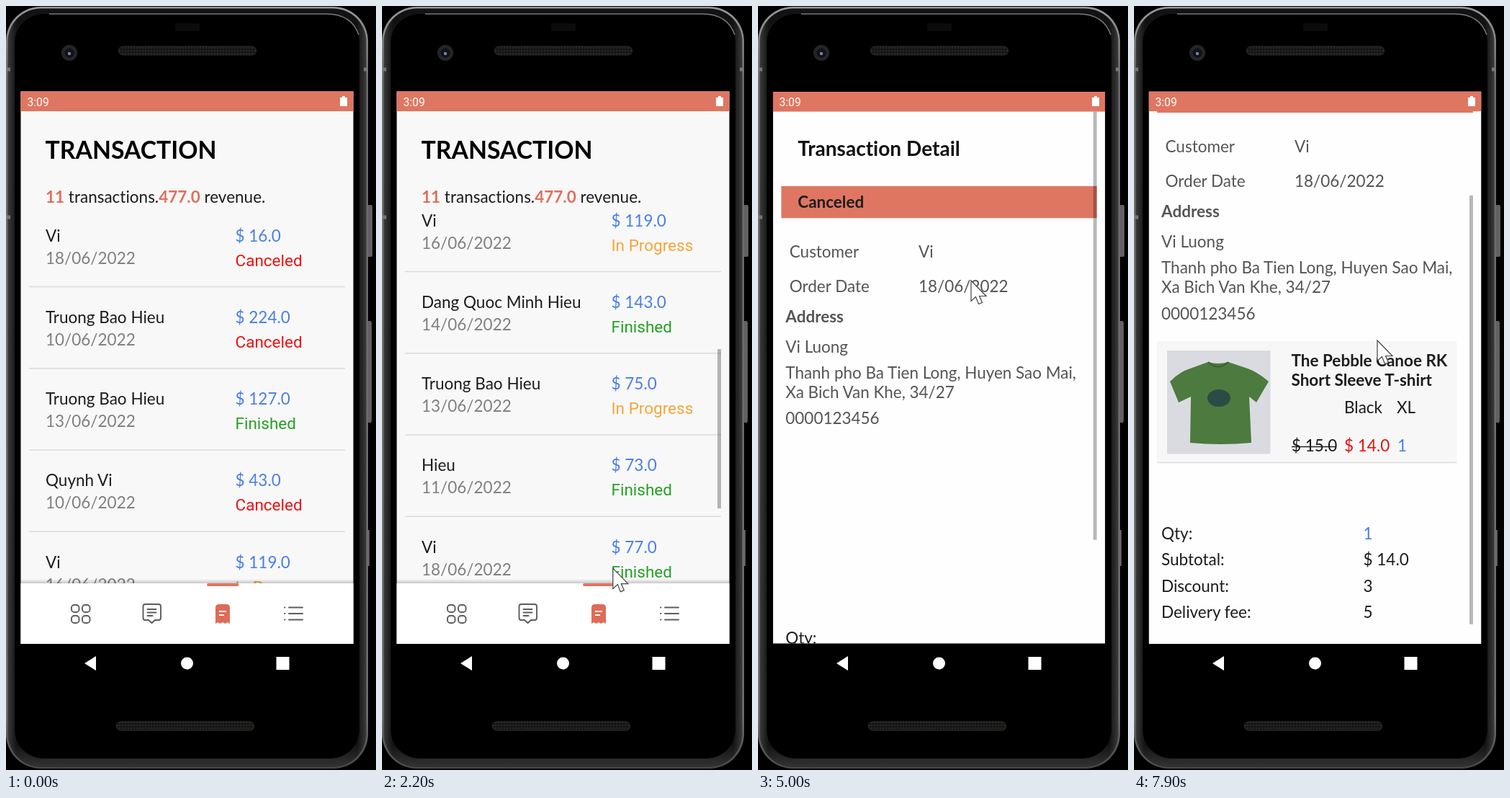
An HTML page that plays this animation: 514x1060 px, repeating every 8000 ms.

```html
<!DOCTYPE html>
<html lang="en">
<head>
<meta charset="utf-8">
<title>Transactions</title>
<style>
html, body { margin: 0; width: 100%; height: 100%; overflow: hidden; background: #000; }
svg { display: block; width: 514px; height: 1060px; }
text { font: 22.5px Lato, sans-serif; font-variant-ligatures: none; fill: #1c1c1c; }
.b { font-weight: 700; }
.red { fill: #df6f5c; }
.date { fill: #808080; }
.price { fill: #4a7fe6; }
.status { font-family: Roboto, sans-serif; }
.soft { fill: #555; }
.icon { fill: none; stroke: #5c5c5c; stroke-width: 1.9; stroke-linecap: round; stroke-linejoin: round; }
</style>
</head>
<body>
<svg viewBox="0 0 514 1060">
  <defs>
    <clipPath id="screen"><rect x="20.5" y="118.5" width="462" height="766.5"/></clipPath>
    <clipPath id="listBox"><rect x="20" y="276.5" width="463" height="525"/></clipPath>
    <clipPath id="detailBox"><rect x="20" y="146" width="463" height="739"/></clipPath>
    <linearGradient id="rim" x2="0" y2="1">
      <stop stop-color="#999"/><stop offset=".1" stop-color="#6a6a6a"/>
      <stop offset=".93" stop-color="#707070"/><stop offset="1" stop-color="#484848"/>
    </linearGradient>
    <linearGradient id="side">
      <stop stop-color="#3a3a3a"/><stop offset=".025" stop-color="#121212"/>
      <stop offset=".975" stop-color="#121212"/><stop offset="1" stop-color="#3a3a3a"/>
    </linearGradient>
    <linearGradient id="chin" x2="0" y2="1">
      <stop offset=".97" stop-color="#333" stop-opacity="0"/><stop offset="1" stop-color="#333"/>
    </linearGradient>
    <linearGradient id="shade" x2="0" y2="1">
      <stop stop-color="#000" stop-opacity="0"/><stop offset="1" stop-color="#000" stop-opacity=".2"/>
    </linearGradient>
    <pattern id="mesh" width="4" height="4" patternUnits="userSpaceOnUse">
      <rect width="4" height="4" fill="#161616"/><circle cx="2" cy="2" r="1" fill="#303030"/>
    </pattern>
  </defs>

  <!-- phone body -->
  <path d="M503 276h4q2 0 2 3v66q0 3-2 3h-4zM503 437h3q2 0 2 3v135q0 3-2 3h-3zM503 727h2v50h-2z" fill="#626262"/>
  <rect y="1" width="503" height="1057" rx="48" fill="url(#rim)"/>
  <rect x="2.5" y="3.5" width="498" height="1052" rx="46" fill="url(#side)"/>
  <rect x="2.5" y="3.5" width="498" height="1052" rx="46" fill="url(#chin)"/>
  <rect x="12" y="11" width="479" height="1033" rx="40" fill="#000"/>
  <path d="M60 11H445Q480 11 490 40" fill="none" stroke="#777" stroke-width="1.5"/>
  <path d="M0 88h6M0 293h6M497 88h6" stroke="#777" stroke-width="5"/>
  <rect x="235" y="24" width="34" height="11" rx="2" fill="#0b0b0b"/>
  <circle cx="88" cy="65" r="11" fill="#242527"/>
  <circle cx="88" cy="65" r="6.5" fill="#101218"/>
  <circle cx="88" cy="66" r="2.200" fill="#7884a4"/>
  <rect x="156.500" y="56" width="191" height="12" rx="6" fill="url(#mesh)" stroke="#2c2c2c"/>
  <rect x="153.500" y="993" width="191" height="12" rx="6" fill="url(#mesh)" stroke="#34332a"/>
  <path d="M109 912 125 902V922ZM375.500 903h18v18h-18z" fill="#fff"/>
  <circle cx="251.500" cy="912" r="8.500" fill="#fff"/>

  <g clip-path="url(#screen)">
    <g id="listPage">
      <rect x="20" y="118" width="463" height="768" fill="#f8f8f8"/>
      <rect x="20" y="118" width="463" height="28" fill="#df7661"/>
      <text class="b" x="54.500" y="211.500" style="font-size:33.750px;fill:#000">TRANSACTION</text>
      <text x="55" y="272.500"><tspan class="b red">11</tspan> transactions.<tspan class="b red">477.0</tspan> revenue.</text>
      <g clip-path="url(#listBox)"><g id="rows"></g></g>
      <rect id="listThumb" x="466" width="5" height="221" fill="#000" opacity=".28"/>
      <rect x="20" y="795" width="463" height="6" fill="url(#shade)"/>
      <rect x="20" y="801" width="463" height="85" fill="#fff"/>
      <rect x="279" y="801" width="44.500" height="4" rx="2" fill="#df7661"/>
      <g class="icon">
        <path d="M190.500 833q0-3 3-3h18.500q3 0 3 3v16q0 3-3 3h-5l-4.500 4-4.500-4h-4.500q-3 0-3-3zM196.500 837h12M196.500 841.500h12M196.500 846h7"/>
        <path d="M393 834.500h19M393 843h19M393 851.500h19M387 834.500h.5M387 843h.5M387 851.500h.5"/>
        <g id="grid"></g>
      </g>
      <path d="M291 857V835q0-5 5-5h10q5 0 5 5v22l-3.300-2-3.300 2-3.400-2-3.300 2-3.400-2z" fill="#df6b57"/>
      <path d="M296 840h10M296 845h7" stroke="#fff" stroke-width="2"/>
    </g>

    <g id="detailPage">
      <rect x="20.500" y="118.500" width="462" height="766.500" fill="#fefefe"/>
      <g clip-path="url(#detailBox)">
        <g id="detail">
          <text class="b" x="55" y="208" style="font-size:28.100px;fill:#111">Transaction Detail</text>
          <rect x="32" y="249.500" width="439" height="44.500" fill="#df7661"/>
          <text class="b" x="55" y="279.500">Canceled</text>
          <g id="loaded">
            <rect x="32" y="611" width="416.500" height="168" fill="#f7f7f7"/>
            <path d="M32 779.500H448.500" stroke="#dcdcdc" stroke-width="1.500"/>
            <rect x="46" y="624" width="143.500" height="143.500" fill="#d9dbe1"/>
            <path d="M103 640Q117 644 131 640L158 649Q172 654 187 667L170 696 160 688 163 752Q120 756 78 752L79 688 62 696 50 667Q64 653 78 649Z" fill="#4d7a3e"/>
            <path d="M103 640Q117 653 131 640" fill="none" stroke="#3a602e" stroke-width="2"/>
            <ellipse cx="118" cy="690" rx="16" ry="12" fill="#2b4c46"/>
            <path d="M219 757.500h61" stroke="#222" stroke-width="1.500"/>
          </g>
        </g>
      </g>
      <rect id="detailThumb" x="466" width="5" height="595" fill="#000" opacity=".28"/>
      <rect x="20.500" y="118.500" width="462" height="27.500" fill="#df7661"/>
    </g>
    <text x="29.500" y="138.500" style="font:15.700px Roboto,sans-serif;fill:#fff">3:09</text>
    <path d="M464 127h3v-2h4v2h3v12h-10z" fill="#fff"/>
  </g>
  <path id="cursor" d="M0 0V28.500L6.500 22.500 10.500 32.500 15.500 30.500 11.500 21.500H21Z" fill="#fff" stroke="#444" stroke-width="1.200"/>
</svg>
<script>
const $ = id => document.getElementById(id);
const label = (x, y, str, cls = '', color = '') =>
  `<text x="${x}" y="${y}" class="${cls}" ${color && `style="fill:${color}"`}>${str}</text>`;

const ROW = 113.25;
const colors = { Canceled: '#ec1313', Finished: '#25a025', 'In Progress': '#f3a63b' };
const orders = [
  ['Vi', 18, 16, 'Canceled'], ['Truong Bao Hieu', 10, 224, 'Canceled'],
  ['Truong Bao Hieu', 13, 127, 'Finished'], ['Quynh Vi', 10, 43, 'Canceled'],
  ['Vi', 16, 119, 'In Progress'], ['Dang Quoc Minh Hieu', 14, 143, 'Finished'],
  ['Truong Bao Hieu', 13, 75, 'In Progress'], ['Hieu', 11, 73, 'Finished'],
  ['Vi', 18, 77, 'Finished'], ['Truong Bao Hieu', 11, 159, 'Canceled'],
  ['Quynh Vi', 12, 57, 'Finished']
];
$('rows').innerHTML = orders.map(([name, day, price, status], i) =>
  `<g transform="translate(0 ${i * ROW})">` +
  label(55, 326.5, name) + label(55, 357.5, day + '/06/2022', 'date') +
  label(318.5, 326.5, `$ ${price}.0`, 'price') +
  label(318.5, 360.5, status, 'status', colors[status]) +
  '<path d="M32 389.500H471" stroke="#dcdcdc" stroke-width="1.500"/></g>').join('');

$('grid').innerHTML = [91, 106].map(x => [831, 846].map(y =>
  `<rect x="${x}" y="${y}" width="10.500" height="10" rx="3.800"/>`).join('')).join('');

const totals = [['Qty:', '1', 'price'], ['Subtotal:', '$ 14.0'], ['Discount:', '3'], ['Delivery fee:', '5']];
const totalY = i => 886 + i * 36.3;

$('detail').insertAdjacentHTML('beforeend', [
  [43.5, 349, 'Customer'], [223, 349, 'Vi'],
  [43.5, 396.5, 'Order Date'], [223, 396.5, '18/06/2022'],
  [38, 439, 'Address', 'b'], [38, 481, 'Vi Luong'],
  [38, 517, 'Thanh pho Ba Tien Long, Huyen Sao Mai,'],
  [38, 544, 'Xa Bich Van Khe, 34/27'], [38, 580.5, '0000123456'],
  [38, 1054.5, 'Total:', 'b']
].map(([x, y, str, cls = '']) => label(x, y, str, cls + ' soft')).join('') +
  totals.map(([name], i) => label(38, totalY(i), name)).join(''));

$('loaded').insertAdjacentHTML('beforeend',
  label(218.5, 645.5, 'The Pebble Canoe RK', 'b') + label(218.5, 672.5, 'Short Sleeve T-shirt', 'b') +
  label(292, 710.5, 'Black') + label(365, 710.5, 'XL') +
  label(219, 763.5, '$ 15.0') + label(292, 763.5, '$ 14.0', '', '#ee1111') + label(366, 763.5, '1', 'price') +
  totals.map(([, value, cls], i) => label(318.5, totalY(i), value, cls)).join('') +
  label(318.5, 1054.5, '$ 22.0', 'b', '#ee1111'));

const linear = p => p;
const out = p => 1 - (1 - p) ** 2;
const smooth = p => p * p * (3 - 2 * p);
const clamp = p => Math.min(1, Math.max(0, p));

// Keys are [time, values, easing towards this key].
function track(keys, t) {
  const i = keys.findIndex(k => k[0] > t);
  if (i < 1) return (i ? keys[keys.length - 1] : keys[0])[1];
  const [t0, a] = keys[i - 1], [t1, b, ease = linear] = keys[i];
  const p = ease((t - t0) / (t1 - t0));
  return a.map((v, j) => v + (b[j] - v) * p);
}

const pointer = [
  [0, [530, 760]], [400, [320, 740], smooth], [550, [300, 740]], [850, [243, 387]],
  [1600, [243, 387]], [1850, [290, 533], smooth], [2350, [334, 886]],
  [3400, [285, 347], smooth], [4500, [285, 347]], [5000, [296, 381], smooth],
  [5600, [310, 640], smooth], [5750, [310, 640]], [6200, [315, 338]],
  [7300, [315, 338]], [7600, [338, 431], smooth], [7900, [338, 464]]
];
const listScroll = [[550, [0]], [850, [353]], [1807, [721], out], [1850, [721]], [2350, [368]], [3050, [0], out]];
const listBar = [[500, [0]], [550, [1]], [3200, [1]], [3450, [0]]];
const detailScroll = [[5750, [0]], [6020, [179]], [7600, [179]], [7900, [146]]];
const detailBar = [[5300, [1]], [5500, [0]], [5700, [0]], [5750, [1]], [7150, [1]], [7400, [0]], [7600, [0]], [7650, [1]]];

const shift = (id, x, y) => $(id).setAttribute('transform', `translate(${x} ${y})`);

function showPage(id, scale, opacity) {
  $(id).setAttribute('transform', `translate(251.500 501.500) scale(${scale}) translate(-251.500 -501.500)`);
  $(id).setAttribute('opacity', opacity);
}

function scrollTo(name, content, top, ratio, scroll, bar, t) {
  const [y] = track(scroll, t);
  shift(content, 0, -y);
  $(name + 'Thumb').setAttribute('y', top + ratio * y);
  $(name + 'Thumb').setAttribute('opacity', .28 * track(bar, t)[0]);
}

function frame(now) {
  const t = Math.floor(now % 8000 / 100) * 100;
  shift('cursor', ...track(pointer, t));
  scrollTo('list', 'rows', 276.5, .421, listScroll, listBar, t);
  scrollTo('detail', 'detail', 146, .8, detailScroll, detailBar, t);
  const open = out(clamp((t - 4550) / 500));
  showPage('listPage', 1 + .05 * open, 1 - open);
  showPage('detailPage', .85 + .15 * open, clamp((t - 4550) / 100));
  $('loaded').setAttribute('visibility', t < 5200 ? 'hidden' : 'visible');
  requestAnimationFrame(frame);
}
requestAnimationFrame(frame);
</script>
</body>
</html>
```
